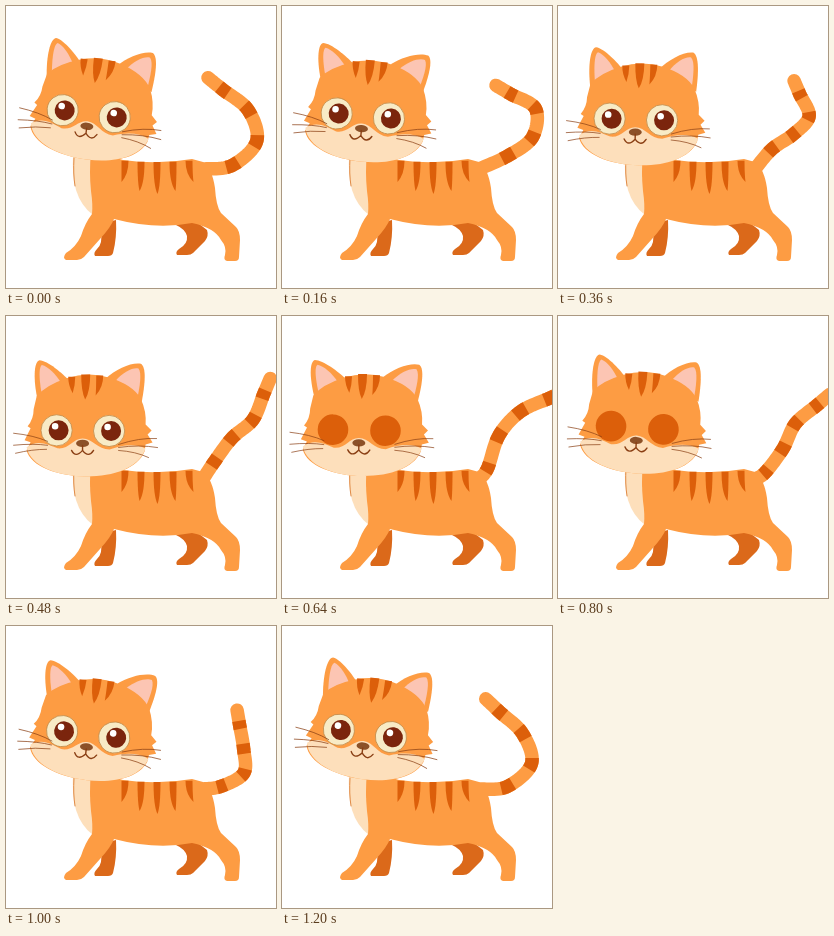
Recreate the animation shown at these times as an HTML page. Size 270 by 282 pixels, loop 1240 ms.

```html
<!DOCTYPE html>
<html lang="en">
<head>
<meta charset="utf-8">
<title>Cat</title>
<style>
  html, body { margin: 0; height: 100%; overflow: hidden; background: #fff; }
  svg { display: block; width: 100vw; height: 100vh; }
  .fur { fill: #fd9c43; }
  .cream { fill: #fddfbb; }
  .dark { fill: #dc5f0a; }
  .far { fill: #db691a; }
  .pink { fill: #fcc5b3; }
  .line { fill: none; stroke: #8a3f14; stroke-linecap: round; }
  .tail { fill: none; stroke-width: 13.5; stroke-linejoin: round; }
</style>
</head>
<body>
<svg viewBox="0 0 270 282">
  <path id="tail" class="tail" stroke="#fd9c43" stroke-linecap="round"/>
  <path id="bands" class="tail" stroke="#dc5f0a"/>

  <g class="far">
    <path d="M93 218L110 214Q111 232 107 247Q106 250 102 250H89Q87 247 91 243Q97 238 95 224Z"/>
    <path d="M170 219L187 213L201 224Q203 230 199 235L187 247Q185 249 181 249H171Q169 246 173 243Q182 238 181 230Q179 223 170 219Z"/>
  </g>
  <path class="cream" d="M67 148Q66 170 70 184Q75 200 87 209L98 190V148Z"/>
  <path d="M68 152Q67 168 69 180" class="line" style="stroke:#e08a45"/>
  <path class="fur" d="M85 146H104Q108 152 117 154Q152 159 186 153L197 156Q206 162 209 182Q210 200 215 207
    L230 221Q234 225 234 234L233 251Q233 255 229 255H221Q217 254 219 249Q221 241 215 234
    Q209 222 186 217Q150 224 108 213Q105 221 94 233L78 251Q75 254 71 254H60Q56 252 60 247
    Q70 241 75 230Q79 217 86 208Q87 199 85 185Q83 166 85 146Z"/>
  <g id="backStripes" class="dark"></g>

  <g id="head"><g transform="translate(-77 -114)">
    <g id="leftEar">
      <path class="fur" d="M31 84C28 62 30 44 36 43C44 44 58 58 64 66Z"/>
      <path class="pink" d="M36 82C34 66 34 50 38 48C44 50 51 58 56 68Z"/>
    </g>
    <g id="rightEar">
      <path class="fur" d="M99 64C109 53 124 45 133 46C139 49 139 66 137 85Z"/>
      <path class="pink" d="M108 67C116 55 126 50 131 51C135 55 134 69 132 84Z"/>
    </g>
    <path class="fur" d="M28 93L31 80Q40 69 61 62Q82 55 103 61Q127 68 135 82Q141 95 140 108L146 114L142 118L147 126L140 128
      L139 135C132 152 108 160 81 160C52 160 25 150 21 134L25 126L19 124L25 112L22 110Q28 103 28 93Z"/>
    <path class="cream" d="M21 131C32 123 42 128 52 132C64 133 67 122 77 122C87 122 92 133 104 133
      C118 128 130 127 140 132C133 152 108 160 81 160C52 160 25 150 21 131Z"/>
    <g id="browStripes" class="dark"></g>
    <g id="eyes"></g>
    <ellipse cx="77" cy="127" rx="6.5" ry="3.6" fill="#8c5128"/>
    <path class="line" stroke-width="1.4" d="M77 129V134M66 134Q70 142 77 134Q83 142 88 134"/>
    <path class="line" stroke-width=".7" d="M8 117Q28 119 42 125M8 129Q28 127 42 129M10 137Q27 133 41 133
      M113 128Q134 121 151 122M113 131Q134 128 152 131M113 134Q130 135 143 141"/>
  </g></g>
</svg>
<script>
const LOOP = 1240, STEP = 40;
const $ = id => document.getElementById(id);

// cosine swing, highest at time `peak`, going round `times` per loop
const wave = (t, peak, times = 1) => Math.cos(2 * Math.PI * times * (t - peak) / LOOP);

// each joint's heading in degrees is rest + swing, plus a double-speed whip
const root = [197, 163];
const joints = [
  { length: 22, rest: 30, swing: -27, peak: -110, whip: 0 },
  { length: 30, rest: 45, swing: -13, peak: 20, whip: 13 },
  { length: 28, rest: 72, swing: 32, peak: -80, whip: 4 },
  { length: 28, rest: 94, swing: 62, peak: 80, whip: -10 },
  { length: 17, rest: 94, swing: 62, peak: 80, whip: -10 },
];

function tailPoints(t) {
  const beat = wave(t, 20, 2);
  let [x, y] = root;
  return [root, ...joints.map(({ length, rest, swing, peak, whip }, i) => {
    const heading = (rest + swing * wave(t, peak) + whip * beat) * Math.PI / 180;
    const reach = length * (i ? 1 + .15 * beat : 1 + .45 * wave(t, 140));
    x += reach * Math.cos(heading);
    y -= reach * Math.sin(heading);
    return [x, y];
  })];
}

// smooth curve through the points, from parameter u0 to u1
function curve(points, u0, u1) {
  const last = points.length - 1, steps = Math.ceil((u1 - u0) * 12);
  const at = i => points[Math.max(0, Math.min(last, i))];
  const path = [];
  for (let j = 0; j <= steps; j++) {
    const u = u0 + (u1 - u0) * j / steps, i = Math.min(last - 1, Math.floor(u)), s = u - i;
    const [p, a, b, q] = [i - 1, i, i + 1, i + 2].map(at);
    path.push([0, 1].map(k => (a[k] + s / 2 * (b[k] - p[k] + s * (2 * p[k] - 5 * a[k] + 4 * b[k] - q[k]
      + s * (3 * (a[k] - b[k]) + q[k] - p[k])))).toFixed(2)));
  }
  return 'M' + path.join('L');
}

const stripe = (x, top, tip, bottom, half = 3.5) =>
  `<path d="M${x - half} ${top}H${x + half}Q${x + half} ${bottom - 8} ${tip} ${bottom}Q${x - half} ${bottom - 8} ${x - half} ${top}Z"/>`;
$('browStripes').innerHTML = stripe(66, 60.5, 67, 77) + stripe(80, 58, 79.5, 83, 4.5) + stripe(94, 59, 90, 79);
$('backStripes').innerHTML = [-2, -1, 0, 1, 2].map(k =>
  stripe(151 + 16 * k, 156 - k * k / 3, 151.5 + 18 * k, 188 - 3 * k * k)).join('');

const eye = (x, y) => `
  <g class="open">
    <circle cx="${x}" cy="${y}" r="15.6" fill="#f8ebc6" stroke="#c08a48" stroke-width=".8"/>
    <circle cx="${x + 2}" cy="${y}" r="10" fill="#7b250d"/>
    <circle cx="${x - 1.5}" cy="${y - 4}" r="3.3" fill="#fff"/>
  </g>
  <circle class="dark lid" cx="${x}" cy="${y}" r="15.3"/>`;
$('eyes').innerHTML = eye(51, 114) + eye(103.5, 114.5);

const show = (selector, visible) => document.querySelectorAll(selector)
  .forEach(el => el.style.display = visible ? '' : 'none');

function draw(t) {
  const lift = (1 + wave(t, -90)) / 2;
  $('head').setAttribute('transform',
    `translate(${76.5 + 6.3 * lift} ${114.5 - 7.5 * lift}) rotate(${7.5 * lift})`);

  const flick = 5 * (1 - wave(t, -34, 3));
  $('leftEar').setAttribute('transform', `rotate(${-flick} 45 70)`);
  $('rightEar').setAttribute('transform', `rotate(${flick} 120 72)`);

  const tail = tailPoints(t);
  $('tail').setAttribute('d', curve(tail, 0, 5));
  $('bands').setAttribute('d', [1, 2, 3, 4].map(u => curve(tail, u - .2, u + .2)).join(''));

  const closed = t >= 520 && t < 880;
  show('.lid', closed);
  show('.open', !closed);
}

const start = performance.now();
function loop() {
  const t = (performance.now() - start) % LOOP;
  draw(Math.floor(t / STEP) * STEP);
  requestAnimationFrame(loop);
}
loop();
</script>
</body>
</html>
```
